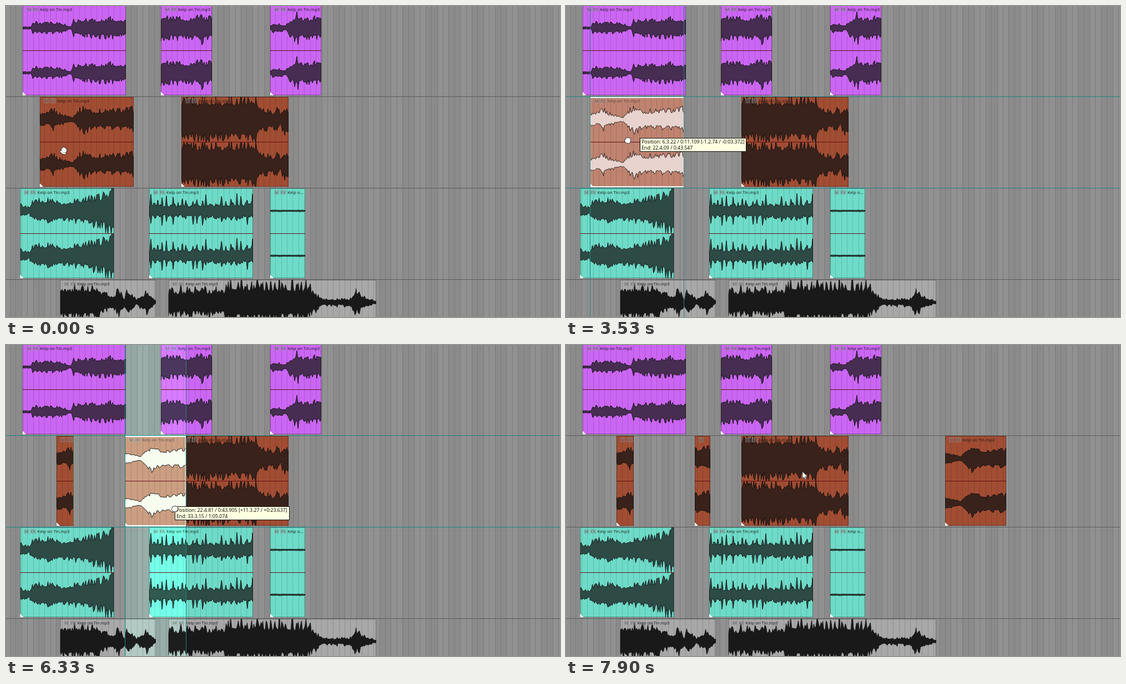
Write an HTML page with a canvas that moves like this. It is 998 px wide and 561 px high and loops after 8 s.

```html
<!DOCTYPE html>
<html lang="en">
<head>
<meta charset="utf-8">
<style>
  html, body { margin: 0; width: 100%; height: 100%; overflow: hidden; background: #8e8e8e; }
  canvas { display: block; }
</style>
</head>
<body>
<canvas id="stage" width="998" height="561"></canvas>
<script>
const W = 998, H = 561, LOOP = 8000, TICK = 129.66;
const ctx = document.getElementById('stage').getContext('2d');

const TITLE = 'Kelp on Tin.mp3', TITLE_SHORT = 'Kelp o...';
const BAR = 10.4, FIRST_BAR = -13.9, PX_PER_SEC = 5.2, CLIP_H = 162;
const TEAL_LINE = '#1f8583';

const PURPLE = { top: -1, fill: '#cb66f4', wave: '#472d51' };
const BROWN = { top: 164, fill: '#a14d33', wave: '#39221b' };
const TEAL = { top: 329, fill: '#6edbc8', wave: '#2d4a45' };
const GREY = { top: 494, fill: '#a8a8a8', wave: '#191919' };
const SELECTED = { top: 164, fill: '#bf8370', wave: '#e8d3ce' };

// Loudness key points as [x, level]; hits add thin random peaks relative to the level.
const vocal = { seed: 1, level: [[0, 10], [17, 10], [21, 19], [34, 10], [60, 4], [64, 11], [82, 22], [96, 14], [169, 18]] };
const clips = [
  [PURPLE, 30, 186, { seed: 3, level: [[0, 2], [15, 2], [18, 9], [70, 8], [82, 3], [88, 3], [91, 12], [158, 16], [186, 13]] }],
  [PURPLE, 279, 92, { seed: 4, level: [[0, 18], [5, 23], [12, 17], [62, 17], [72, 25], [79, 17], [92, 17]] }],
  [PURPLE, 476, 92, { seed: 5, level: [[0, 4], [8, 8], [28, 4], [33, 11], [49, 23], [60, 14], [73, 18], [92, 15]] }],
  [BROWN, 316, 193, { seed: 2, level: [[0, 35], [60, 33], [135, 36], [142, 21], [165, 11], [172, 22], [178, 9], [185, 22], [193, 17]] }],
  [TEAL, 25.5, 169, { seed: 6, level: [[0, 11], [17, 5], [20, 14], [50, 21], [75, 15], [110, 20], [148, 25], [169, 42]] }],
  [TEAL, 258, 187, { seed: 7, hits: 2.6, level: [[0, 11], [30, 9], [187, 12]] }],
  [TEAL, 476, 63, { seed: 8, level: [[0, 1.2]] }],
  [GREY, 97.5, 172.5, { seed: 9, level: [[0, 26], [70, 26], [75, 15], [100, 11], [104, 24], [116, 6], [122, 22], [137, 4], [157, 18], [172, 3]] }],
  [GREY, 292.5, 374.5, { seed: 10, hits: .7, level: [[0, 20], [100, 22], [110, 30], [250, 26], [278, 5], [315, 5], [327, 5], [338, 19], [352, 8], [374, 2]] }]
];

// Timeline in ticks.
const SELECT = 13, DRAG = 14, DROP = 35, RANGE = 38, RANGE_DONE = 42, MARQUEE_END = 44;
const MOVE = 47, SPLIT = 49, MOVE_DROP = 56, DESELECT = 59;

// Motion key points: [tick, x, y], eased in between. Drag paths carry the clip's x.
const pointerPath = [
  [1, 104, 262], [3, 101, 275], [5, 101, 275], [9, 107, 192], [11, 107, 192], [14, 128, 293], [35, 161, 272],
  [38, 122, 188], [42, 232, 289], [44, 232, 289], [45, 216, 294], [47, 214, 294], [56, 771, 290], [60, 624, 272], [61, 426, 228]
];
const START = 61, DROPPED = 91.0893;
const clipPath = [
  [14, START, 293], [20, 632.1025, 293], [22, 632.1025, 293], [25, 142, 262], [27, 43.4635, 243], [29, -8, 246], [34, DROPPED, 276]
];
const piecePath = [[47, DROPPED, 294], [49, 214, 296], [51, 538.4193, 297], [54, 683, 293]];

const CUT_L = 122, CUT_R = 232, MARQUEE_TOP = 188;
const FULL_W = 169, PIECE_W = 110.08;

function follow(path, tick) {
  const next = path.findIndex(p => p[0] > tick);
  if (next <= 0) return (next ? path[path.length - 1] : path[0]).slice(1);
  const a = path[next - 1], b = path[next];
  const u = (tick - a[0]) / (b[0] - a[0]), ease = u * u * (3 - 2 * u);
  return [1, 2].map(i => a[i] + (b[i] - a[i]) * ease);
}

const rand = (i, seed) => {
  const v = Math.sin(i * 127.1 + seed * 311.7) * 43758.5453;
  return v - Math.floor(v);
};

function levelAt(points, x) {
  const next = points.findIndex(p => p[0] > x);
  if (next <= 0) return (next ? points[points.length - 1] : points[0])[1];
  const [x0, a] = points[next - 1], [x1, b] = points[next];
  return a + (b - a) * (x - x0) / (x1 - x0);
}

function amplitude({ level, seed, hits = 0 }, side, x) {
  const key = seed + side * 50;
  const noise = (rand(Math.floor(x / 2), key) + rand(Math.ceil(x / 2), key)) / 2;
  const cell = Math.floor(x / 9), centre = 9 * (cell + .2 + .6 * rand(cell, seed));
  const peak = hits * rand(cell, key + 7) * Math.max(0, 1 - Math.abs(x - centre) / 1.8);
  return levelAt(level, x) * (.72 + .65 * noise * noise + peak);
}

function rect(x, y, w, h, color) {
  ctx.fillStyle = color;
  ctx.fillRect(x, y, w, h);
}

function text(str, x, y, size, color) {
  ctx.font = `${size}px "Open Sans", "Noto Sans", sans-serif`;
  ctx.fillStyle = color;
  ctx.fillText(str, x, y);
}

function clipped(x, y, w, h, draw) {
  ctx.save();
  ctx.beginPath();
  ctx.rect(x, y, w, h);
  ctx.clip();
  draw();
  ctx.restore();
}

function drawGrid() {
  for (let i = 0; FIRST_BAR + i * BAR < W; i++) {
    const x = Math.round(FIRST_BAR + i * BAR);
    rect(x, 0, 11, H, i % 4 < 2 ? '#919191' : '#8b8b8b');
    rect(x, 0, 1, H, '#7b7b7b');
  }
}

function drawWave(wave, x, w, offset, mid, color) {
  ctx.beginPath();
  for (let i = 0; i <= w; i++) ctx.lineTo(x + i, mid - amplitude(wave, 0, i + offset));
  for (let i = Math.floor(w); i >= 0; i--) ctx.lineTo(x + i, mid + amplitude(wave, 1, i + offset));
  ctx.closePath();
  ctx.fillStyle = color;
  ctx.fill();
  ctx.strokeStyle = '#141212';
  ctx.lineWidth = .9;
  ctx.stroke();
}

function drawLabel({ top, fill }, x, w, selected) {
  const badge = (str, dx, width) => {
    rect(x + dx, top + 2.5, width, 9, 'rgba(150,150,150,.4)');
    text(str, x + dx + 1, top + 10, 8, selected ? 'rgba(70,50,45,.6)' : 'rgba(60,60,60,.65)');
  };
  badge('M', 7, 9);
  if (w > 30) badge('FX', 18, 11);
  if (w < 45) return;
  const short = w < 90;
  ctx.globalAlpha = .5;
  rect(x + 30, top + 2.5, short ? 32 : 60, 9, fill);
  ctx.globalAlpha = 1;
  text(short ? TITLE_SHORT : TITLE, x + 31, top + 9.8, 7.7, selected ? '#5a4640' : '#1d1a1a');
}

function drawClip(style, x, w, wave, offset = 0) {
  const { top, fill } = style, selected = style === SELECTED;
  clipped(x, top, w, CLIP_H, () => {
    rect(x, top, w, CLIP_H, fill);
    for (let g = FIRST_BAR; g < x + w; g += BAR) rect(Math.round(g), top, 1, CLIP_H, 'rgba(0,0,0,.13)');
    for (const channel of [0, 81]) {
      clipped(x, top + channel, w, 81, () => drawWave(wave, x, w, offset, top + channel + 40.5, style.wave));
    }
    rect(x, top + 81, w, 1, '#621016');
    drawLabel(style, x, w, selected);
  });
  ctx.strokeStyle = selected ? 'rgba(255,255,255,.55)' : 'rgba(0,0,0,.3)';
  ctx.lineWidth = 1;
  ctx.strokeRect(x + .5, top + .5, w - 1, CLIP_H - 1);
  if (selected) for (const edge of [0, CLIP_H - 1]) rect(x, top + edge, w, 2, '#f4f4f2');
  ctx.fillStyle = '#fff';
  ctx.fill(new Path2D(`M${x} ${top + CLIP_H - 6}l6 6h-6Z`));
}

function drawTimeSelection(x, w) {
  ctx.globalCompositeOperation = 'color-dodge';
  rect(x, 0, w, H, 'rgb(15,43,36)');
  ctx.globalCompositeOperation = 'source-over';
}

const pad = n => String(n).padStart(2, '0');

function bars(value, first) {
  const hundredths = Math.round(value * 400), rest = hundredths % 400;
  return `${Math.floor(hundredths / 400) + first}.${Math.floor(rest / 100) + first}.${pad(rest % 100)}`;
}

function clock(sec) {
  const m = Math.floor(sec / 60);
  return `${m}:${(sec - m * 60).toFixed(3).padStart(6, '0')}`;
}

const stamp = sec => `${bars(sec / 2, 1)} / ${clock(sec)}`;

function drawTooltip(x, y, clipX, startX, length) {
  const sec = 14.4816 + (clipX - START) / PX_PER_SEC, delta = (clipX - startX) / PX_PER_SEC;
  const sign = delta < 0 ? '-' : '+', size = Math.abs(delta);
  const change = size < .001 ? '' : ` [${sign}${bars(size / 2, 0)} / ${sign}${clock(size)}]`;
  const line = `Position: ${stamp(sec)}${change}`;
  ctx.font = '8.75px "Open Sans", "Noto Sans", sans-serif';
  const w = Math.round(ctx.measureText(line).width) + 7;
  rect(x, y, w, 25, '#111');
  rect(x + 1, y + 1, w - 2, 23, '#ffffe1');
  text(line, x + 3, y + 10, 8.75, '#000');
  text(`End: ${stamp(sec + length)}`, x + 3, y + 21, 8.75, '#000');
}

function drawArrow(x, y) {
  const shape = new Path2D('M0 0V13L3 10.2 5 14.5 7 13.7 5.2 9.5H9.2Z');
  ctx.save();
  ctx.translate(x, y);
  ctx.fillStyle = '#fff';
  ctx.strokeStyle = '#222';
  ctx.lineWidth = .8;
  ctx.fill(shape);
  ctx.stroke(shape);
  ctx.restore();
}

function drawHand(x, y, closed) {
  const shape = new Path2D(closed
    ? 'M-3 -3V0M-1 -4V0M1.4 -4V0M3.6 -3V1M-4.5 0L-2 3M-2 1H3M-1 3H2.5'
    : 'M-3 -4L-2 0M-.8 -6V0M1.6 -5.5V0M4 -3.5L3.4 1M-5.2 0L-2 3M-2 1H3M-1 4H2.5');
  ctx.save();
  ctx.translate(x, y);
  ctx.lineCap = 'round';
  for (const [color, width] of [['#222', 4], ['#fff', 2.4]]) {
    ctx.strokeStyle = color;
    ctx.lineWidth = width;
    ctx.stroke(shape);
  }
  ctx.restore();
}

function drawMarquee(x, y) {
  const w = x - CUT_L, h = y - MARQUEE_TOP;
  rect(CUT_L, MARQUEE_TOP, w, h, 'rgba(115,130,105,.22)');
  ctx.strokeStyle = 'rgba(240,240,225,.4)';
  ctx.lineWidth = 1;
  ctx.strokeRect(CUT_L + .5, MARQUEE_TOP + .5, w, h);
}

function render(time) {
  const tick = Math.floor((time + 35) / TICK);
  const within = (from, to) => tick >= from && tick < to;
  const moving = within(MOVE, MOVE_DROP), dragging = within(DRAG, DROP) || moving;
  const split = tick >= SPLIT, ranged = within(RANGE, DESELECT);
  const [clipX, dragY] = follow(tick >= MOVE ? piecePath : clipPath, tick);
  const clipW = split ? PIECE_W : FULL_W;
  const grab = split ? 90 : moving ? 123 : 68;
  const [px, py] = dragging ? [clipX + grab, dragY] : follow(pointerPath, tick);

  drawGrid();
  for (const y of [163, 328, 493]) rect(0, y, W, 1, dragging && y < 400 ? TEAL_LINE : '#5b5b5b');

  for (const clip of clips) drawClip(...clip);
  if (split) {
    drawClip(BROWN, DROPPED, CUT_L - DROPPED, vocal);
    drawClip(BROWN, CUT_R, 28, vocal, CUT_R - DROPPED);
    if (ranged) rect(CUT_L - 1, 164, 1, CLIP_H, '#4f7a3c');
  }
  drawClip(within(SELECT, DESELECT) ? SELECTED : BROWN, clipX, clipW, vocal, split ? CUT_L - DROPPED : 0);

  if (ranged) {
    if (split) drawTimeSelection(clipX, PIECE_W);
    else drawTimeSelection(CUT_L, (tick < RANGE_DONE ? px : CUT_R) - CUT_L);
  }
  if (within(RANGE, MARQUEE_END)) drawMarquee(px, py);

  if (dragging) {
    for (const x of [clipX, clipX + clipW]) rect(Math.round(x), 0, 1, H, TEAL_LINE);
    drawTooltip(Math.round(clipX + 90), Math.round(py - 5), clipX, moving ? DROPPED : START, split ? 21.169 : 32.4375);
    drawHand(px, py, true);
  } else if (py > 245 && !within(DROP, MARQUEE_END + 1)) {
    drawHand(px, py, false);
  } else {
    drawArrow(px, py);
  }
  if (within(RANGE, MARQUEE_END)) {
    ctx.setLineDash([1, 1]);
    ctx.strokeStyle = '#333';
    ctx.strokeRect(px - 3.5, py - 3.5, 7, 7);
    ctx.setLineDash([]);
  }
}

function frame() {
  render(performance.now() % LOOP);
  requestAnimationFrame(frame);
}
frame();
</script>
</body>
</html>
```
